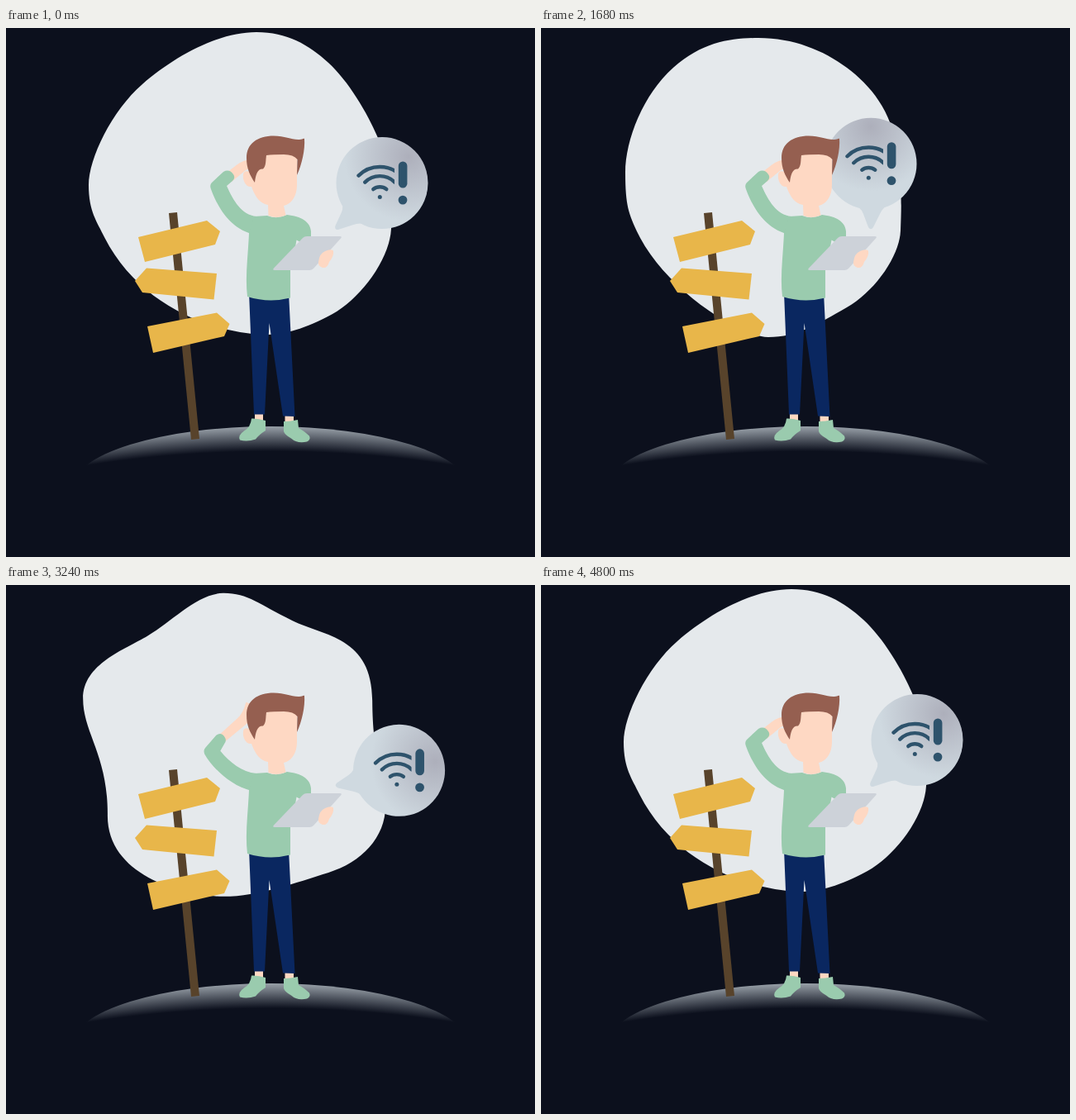
These frames come from a looping animation (640x640 px, 4840 ms). An HTML page:

```html
<!DOCTYPE html>
<html lang="en">
<head>
<meta charset="utf-8">
<title>Lost connection</title>
<style>
  html, body { margin: 0; width: 100%; height: 100%; overflow: hidden; background: #0c101d; }
  svg { display: block; width: 100vw; height: 100vh; }
  .skin { fill: #fed8c3; }
  .green { fill: #9acbae; }
  .sign { fill: #e8b64a; }
  .icon { fill: #2e536c; }
  .waves { fill: none; stroke: #2e536c; stroke-width: 4.4; stroke-linecap: round; }
</style>
</head>
<body>
<svg viewBox="0 0 640 640">
  <defs>
    <radialGradient id="glow" gradientUnits="userSpaceOnUse" cx="320" cy="1962" r="1480">
      <stop offset=".9797" stop-color="#98a0a8" stop-opacity="0"/>
      <stop offset="1" stop-color="#98a0a8"/>
    </radialGradient>
    <radialGradient id="shade" gradientUnits="userSpaceOnUse" cx="0" cy="-124" r="78">
      <stop offset="0" stop-color="#adafbb"/>
      <stop offset="1" stop-color="#cfd9e0"/>
    </radialGradient>
    <clipPath id="cut"><rect x="-40" y="-40" width="55" height="80"/></clipPath>
  </defs>

  <path id="blob" fill="#e5e9ec"/>
  <path fill="url(#glow)" d="M80 557A240 75 0 0 1 560 557Z"/>

  <g id="signpost">
    <path fill="#58432b" d="M197 224L207 223L234 497L224 498Z"/>
    <path class="sign" d="M160 253L243 233L259 246L253 262L168 283Z"/>
    <path class="sign" d="M170 290.5L255 297L251.5 328.5L165 320L156 306Z"/>
    <path class="sign" d="M171 361L255 344.5L270.5 358L264 373L178 393Z"/>
  </g>

  <g id="bubble" fill="url(#shade)">
    <circle cy="-78.8" r="55.5"/>
    <path d="M-24 -31Q-12 -27 -9 -18L-3 -2Q0 2.500 3 -2L11 -18Q15 -27 24 -31L0 -60Z"/>
  </g>
  <g id="icon" class="icon">
    <g class="waves" clip-path="url(#cut)">
      <path d="M-28.5 -9A36.5 36.5 0 0 1 23 -9"/>
      <path d="M-20.7 -1A25.5 25.5 0 0 1 15.3 -1"/>
      <path d="M-10.7 7.5A13 13 0 0 1 5.3 7.5"/>
    </g>
    <circle cx="-2.7" cy="17" r="2.5"/>
    <rect x="19.8" y="-26" width="10.6" height="32" rx="5.3"/>
    <circle cx="25" cy="20.5" r="5.4"/>
  </g>

  <g id="person">
    <path id="forearm" class="skin"/>
    <path id="sleeve" class="green"/>
    <path class="skin" d="M301 464H311V477H301ZM337.5 466H348V479H337.5Z"/>
    <path class="green" d="M297 472.5Q305 472 314 475V487Q306 492 302 497.5Q292 501 283 498.5Q280 493 288 487.5Q296 483 297 472.5Z"/>
    <path class="green" d="M336 476Q344 476 353 474L354 484Q360 487 367 493.5Q369 498 364 500.5Q352 503 345 496.5Q337 492 336 488Z"/>
    <path fill="#0a2760" d="M294 320H342L349.5 470L335 469.5L318.5 357L313 467.5H300Z"/>
    <path class="green" d="M300 228L316 227Q328 232 340 226C357 228 368 234 369 246V254L344 292V326.5Q318 333 292 325C289 300 293 275 294 248Z"/>
    <path fill="#e5e9ec" d="M351.5 256.5L356 259L350 265Z"/>
    <path class="skin" d="M300 148H352V190C352 204 345 213 336 215L338.5 226.5Q328 231 317.5 227L317 214C308 213 301 204 297 192C290 193 286 184 287 177C288 172 293 172 300 178Z"/>
    <path fill="#955f50" d="M301 187C295 178 291 170 291 157C291 140 304 130.5 324 130.5C338 130.5 345 135.5 355 135C358 135 360 133 361 134C362 147 358 165 352 178L352.5 159Q348 153 336 153Q323 153 315 154C314 160 315 167 311 170.5C304 170 302 178 301 187Z"/>
    <path fill="#cdd2d9" d="M364 252H404Q407 252 405 254.5L372 291Q370 293 367 293H325Q322 293 324 290.5L359 254Q361 252 364 252Z"/>
    <path class="skin" d="M378 283Q379 273 386 270Q393 267 396 269.5Q397 276 391 283Q389 291 383 290Q377 288 378 283Z"/>
  </g>
</svg>

<script>
const LOOP = 4840;
const TIP = { x: 399, y: 243, reach: 78.8 };
const $ = id => document.getElementById(id);

// Poses: paths within a part share their commands, so their numbers can be mixed
const round = "M303 5C340 5 366 20 390 42S437 102 450 133S468 205 466 243S428 328 395 346S337 371 312 371C240 368 158 330 119 253C110 234 100 222 100 190S128 100 165 68S255 5 303 5Z";
const egg = "M263 12C305 12 342 27 370 48S425 100 431 150S436 215 435 245S405 318 370 338S310 374 275 374C240 374 150 315 118 250C106 225 102 215 102 175S124 80 160 48S232 12 263 12Z";
const wavy = "M262 10C292 10 305 24 345 43S443 62 443 140S459 230 459 268S430 336 390 348S305 377 262 377C219 377 122 355 123 280C124 205 93 178 93 136S143 78 172 61S232 10 262 10Z";

const sleeve = [
  "M303 228C285 226 275 209 267 191L274 185Q278 181 275 177Q270 170 263 174L249 187Q246 190 248 195C256 217 271 242 297 249Z",
  "M303 228C285 226 271 215 259 201L264 192Q267 188 264 184Q260 178 254 182L241 197Q238 200 240 205C250 222 272 243 297 249Z"
];
const forearm = [
  "M267 175L280 165Q286 160 300 158L304 166L290 172L273 186Z",
  "M256 183L280 161Q287 155 290 141L304 146L292 167L263 191Z"
];

// Tracks of [time, value]
const shapes = [[0, round], [1000, egg], [1680, egg], [3180, wavy], [4600, round]];
const turns = [[0, 45.3], [1680, 0], [3180, 77], [4800, 45.3]];
const lifts = [[0, 0], [600, 1], [1680, 0], [3180, 1], [4800, 0]];

const lerp = (a, b, k) => a + (b - a) * k;
const linear = u => u;

// Same curve as the CSS "ease" timing function
function ease(u) {
  let lo = 0, hi = 1, s = u;
  for (let i = 0; i < 22; i++) {
    s = (lo + hi) / 2;
    if (.75 * s * (1 - s) + s ** 3 < u) lo = s; else hi = s;
  }
  return .3 * s * (1 - s) ** 2 + 3 * s * s * (1 - s) + s ** 3;
}

function mixPath(a, b, k) {
  const ends = b.match(/\d+/g);
  let i = 0;
  return a.replace(/\d+/g, n => lerp(+n, +ends[i++], k).toFixed(2));
}

function at(track, t, mix, curve) {
  const i = track.findIndex(step => step[0] > t);
  if (i < 0) return track.at(-1)[1];
  const [t0, a] = track[i - 1], [t1, b] = track[i];
  return mix(a, b, curve((t - t0) / (t1 - t0)));
}

function draw(t) {
  $("blob").setAttribute("d", at(shapes, t, mixPath, ease));

  const deg = at(turns, t, lerp, ease), rad = deg * Math.PI / 180;
  const x = TIP.x + TIP.reach * Math.sin(rad);
  const y = TIP.y - TIP.reach * Math.cos(rad);
  $("bubble").setAttribute("transform", `translate(${TIP.x} ${TIP.y}) rotate(${deg})`);
  $("icon").setAttribute("transform", `translate(${x} ${y})`);

  const lift = at(lifts, t, lerp, linear);
  $("sleeve").setAttribute("d", mixPath(...sleeve, lift));
  $("forearm").setAttribute("d", mixPath(...forearm, lift));
}

let start;
function tick(now) {
  start ??= now;
  draw((now - start) % LOOP);
  requestAnimationFrame(tick);
}
draw(0);
requestAnimationFrame(tick);
</script>
</body>
</html>
```
